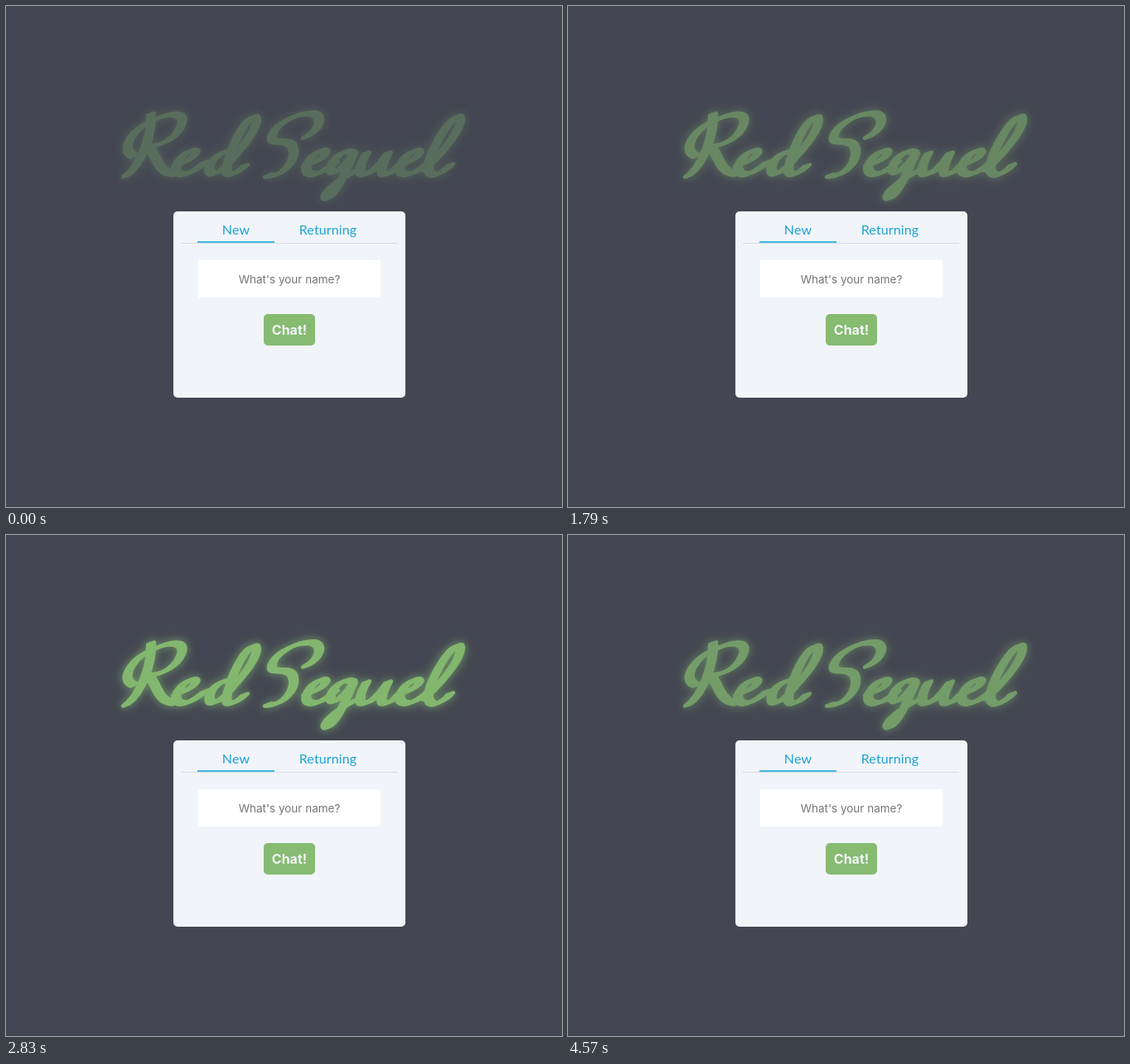
Animation, 671 px wide and 605 px high, one loop 4660 ms. Source, as an HTML page:

```html
<!DOCTYPE html>
<html lang="en">
<head>
<meta charset="utf-8">
<title>Red Sequel</title>
<style>
  html, body { margin: 0; width: 100%; height: 100%; overflow: hidden; background: #444753; }
  svg { display: block; width: 671px; height: 605px; }
  text { text-anchor: middle; }
  .tab { font: 16px Lato, sans-serif; letter-spacing: .12px; fill: #1ba3d4; }
  .hint { font: 13.5px Inter, sans-serif; fill: #757575; }
  .chat { font: 700 16px Inter, sans-serif; fill: #f2f5f8; }
  .glow { filter: drop-shadow(0 0 4px rgba(134, 187, 113, .55)) drop-shadow(0 0 8px rgba(134, 187, 113, .3)); }
  .ink path { fill: none; stroke: #86bb71; stroke-width: 4.4; stroke-linecap: round; stroke-linejoin: round; }
</style>
</head>
<body>
<svg viewBox="0 0 671 605">
  <g id="title" role="img" aria-label="Red Sequel">
    <g class="glow">
      <g id="word" class="ink"></g>
      <g id="weak" class="ink"></g>
    </g>
  </g>
  <rect x="202" y="248" width="280" height="225" rx="5" fill="#f1f4f9"/>
  <rect x="211" y="286" width="261" height="1" fill="#d6dade"/>
  <rect x="231" y="284" width="93" height="2" fill="#41b9e1"/>
  <text class="tab" x="277.5" y="276">New</text>
  <text class="tab" x="388.5" y="276">Returning</text>
  <rect x="232" y="307" width="220" height="45" fill="#fff"/>
  <text class="hint" x="342" y="335">What's your name?</text>
  <rect x="311" y="372" width="62" height="38" rx="5" fill="#86bb71"/>
  <text class="chat" x="342" y="397">Chat!</text>
</svg>
<script>
  const LOOP = 4660;
  const NIB = { x: 0.9, y: -0.35, reach: 4.4, copies: 7 };
  const $ = id => document.getElementById(id);

  const letters = {
    R: 'M175 131C176 158 162 193 145 205 M154 181C136 174 154 146 178 138C202 126 218 130 211 145C205 160 188 168 172 170C182 178 182 202 204 203',
    e: 'M205 192C221 188 233 178 227 175C217 173 200 192 207 201C214 207 228 199 240 189',
    d: 'M274 177C262 171 242 188 246 200C250 207 264 197 275 182C290 166 306 144 301 135C293 130 277 158 270 182C265 196 264 204 272 203C279 202 284 197 288 193',
    S: 'M362 158C378 150 384 134 371 130C346 128 318 148 321 161C325 167 338 160 345 168C354 184 334 207 316 205',
    q: 'M418 177C407 171 389 188 392 199C396 205 409 194 419 179C410 200 398 228 388 232C378 230 400 208 428 197',
    u: 'M435 178C428 190 424 203 431 203C440 204 453 190 461 178C454 192 450 203 457 203C463 203 470 197 474 192',
    l: 'M506 197C532 172 553 144 547 134C539 130 516 166 510 190C508 204 516 206 523 202C529 199 533 196 536 192'
  };

  // A slanted broad nib: the same line repeated along the nib's edge.
  function write(parent, letter, dx = 0) {
    for (let i = 0; i < NIB.copies; i++) {
      const s = NIB.reach * (2 * i / (NIB.copies - 1) - 1);
      const path = document.createElementNS('http://www.w3.org/2000/svg', 'path');
      path.setAttribute('d', letters[letter]);
      path.setAttribute('transform', `translate(${dx + s * NIB.x} ${s * NIB.y})`);
      parent.append(path);
    }
  }

  // Each step is [time, opacity] and holds until the next.
  function flicker(el, steps) {
    const frames = steps.map(([time, opacity]) => ({ offset: time / LOOP, opacity, easing: 'steps(1, end)' }));
    frames.push({ offset: 1, opacity: steps.at(-1)[1] });
    el.animate(frames, { duration: LOOP, iterations: Infinity });
  }

  for (const [letter, dx] of [['R'], ['e'], ['d'], ['S'], ['e', 157], ['u'], ['e', 270], ['l']]) {
    write($('word'), letter, dx);
  }
  write($('weak'), 'q');

  flicker($('title'), [
    [0, .33], [150, .94], [1350, .36], [1500, .85], [1650, .42], [1790, .56],
    [1940, .95], [2090, .39], [2240, .62], [2390, .52], [2540, .34], [2680, .58],
    [2830, .97], [4570, .74]
  ]);
  flicker($('weak'), [
    [0, 1], [150, .8], [1050, .66], [1200, 1], [2980, .55], [3130, 1], [3710, .5], [3860, 1]
  ]);
</script>
</body>
</html>
```
